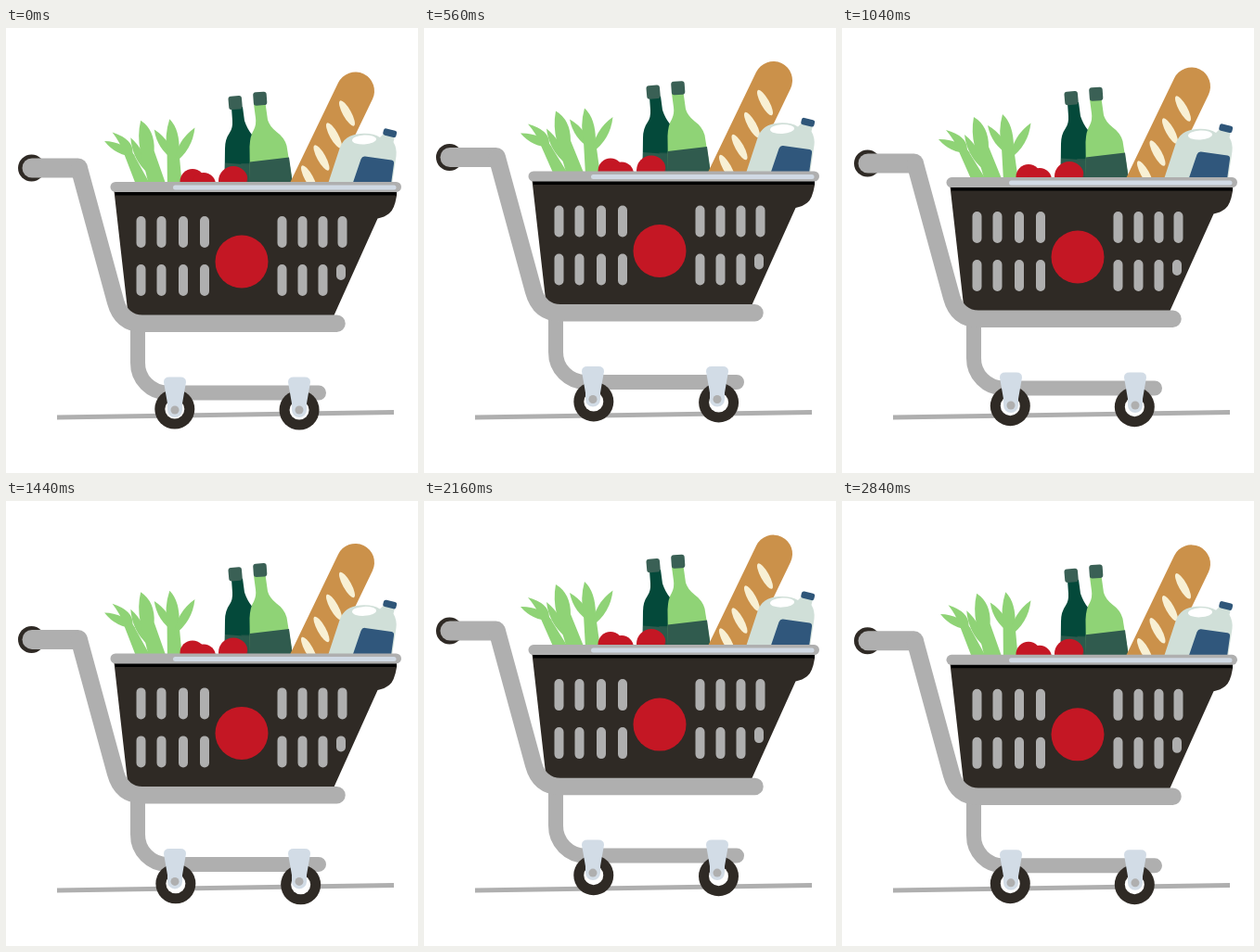
An HTML page for the animation above (2880 ms loop, 444 by 480 pixels).

```html
<!DOCTYPE html>
<html lang="en">
<head>
<meta charset="utf-8">
<title>Shopping cart</title>
<style>
  html, body { margin: 0; width: 100%; height: 100%; overflow: hidden; background: #fff; }
  svg { display: block; width: 100%; height: 100%; }
  .metal { fill: none; stroke: #afafaf; stroke-linecap: round; stroke-linejoin: round; }
  .leaf { fill: #8fd376; }
  .dark { fill: #2f2a25; }
  .red { fill: #c41724; }
  .cap { fill: #3a6055; }
</style>
</head>
<body>
<svg viewBox="0 0 444 480">
  <path class="metal" style="stroke-linecap:butt" stroke-width="5" d="M55 420L418 414.5"/>
  <g id="cart">
    <!-- groceries -->
    <g id="stalks" class="leaf"></g>
    <g id="sideLeaf" class="leaf"></g>
    <g class="red">
      <circle cx="201" cy="165.500" r="13.500"/>
      <circle cx="213" cy="169" r="13"/>
    </g>
    <path fill="#04493a" d="M243 86L255 85L257 100Q260 109 265 115Q269 120 269 130V168H235.500L236 130Q236 120 241 113Q244.500 108 244 100Z"/>
    <path fill="#2b5a4c" d="M236 145.500L268 148V168H235.500Z"/>
    <rect class="cap" x="239.800" y="73.300" width="14.500" height="14.500" rx="3" transform="rotate(-5 247 80)"/>
    <circle class="red" cx="245" cy="165" r="16"/>
    <path fill="#2b5a4c" opacity=".8" d="M253 146H266V168H259Q263 156 253 146Z"/>
    <path class="leaf" d="M267 82L279.500 81L282 99Q284 106 291.500 112Q300 118 302.500 127L309 168H263L262.500 128Q263 116 267 110Q270 104 269 97Z"/>
    <path fill="#305b4e" d="M262.500 144.500L305 139.500L309 168H263Z"/>
    <rect class="cap" x="266.500" y="69" width="14.500" height="14.500" rx="3" transform="rotate(-4 273 76)"/>
    <path fill="none" stroke="#cb914a" stroke-width="41" stroke-linecap="round" d="M376.500 68L325 175"/>
    <g id="scores" fill="#f8f0d4"></g>
    <path fill="#d0dfd8" d="M347 168L359.500 130Q364.500 115 382 114Q395 113 403 118L407 114L419 117L417.500 123Q421.500 130 420.500 138L416 168Z"/>
    <ellipse cx="386" cy="120.500" rx="13" ry="5" fill="#fff" transform="rotate(-3 386 120.500)"/>
    <rect x="406.500" y="109.500" width="14.500" height="7.500" rx="2.500" fill="#2f5679" transform="rotate(14 414 113)"/>
    <path fill="#30577c" d="M387 138.500L415.500 142.500Q418.500 143 418 146.500L415 168H373.500L382.500 141.500Q384 138 387 138.500Z"/>

    <!-- frame and basket -->
    <circle class="dark" cx="27.500" cy="151" r="14.500"/>
    <path class="metal" stroke-width="16" d="M142 322V361A32 32 0 0 0 174 393.500H337"/>
    <path class="dark" d="M116.500 176H421V181Q418.500 196 413 200Q408 204 400.500 205.500L353 311H150Q138 311 131 304Z"/>
    <path d="M117.500 176H421V180.500H118Z"/>
    <path class="metal" stroke-width="21" d="M28 151H77.500"/>
    <path class="metal" stroke-width="18.500" d="M79 152L118 295Q124.500 318.800 147 318.800H356.500"/>
    <path class="metal" stroke-width="11" d="M118 171.500H420.500"/>
    <path class="metal" stroke-width="5" style="stroke:#d0d9e4" d="M182.500 172H418"/>
    <path id="slots" class="metal" stroke-width="10"/>
    <circle class="red" cx="254" cy="252" r="28.500"/>
    <g id="wheels"></g>
  </g>
</svg>
<script>
const LOOP = 2880;
const get = id => document.getElementById(id);

const leaf = (x1, y1, x2, y2, w) => {
  const len = Math.hypot(x2 - x1, y2 - y1);
  const mx = (x1 + x2) / 2, my = (y1 + y2) / 2;
  const nx = (y1 - y2) / len * w, ny = (x2 - x1) / len * w;
  return `<path d="M${x1} ${y1}Q${mx + nx} ${my + ny} ${x2} ${y2}Q${mx - nx} ${my - ny} ${x1} ${y1}"/>`;
};

// A pointed stalk: tip, left and right shoulder below it, left and right foot.
const stalk = (x, y, drop, shoulderL, shoulderR, footL, footR) => `<path d="M${x} ${y}
  Q${shoulderL - 4} ${y + drop * 0.5} ${shoulderL} ${y + drop}L${footL} 170H${footR}
  L${shoulderR} ${y + drop}Q${shoulderR} ${y + drop * 0.3} ${x} ${y}"/>`;

get('stalks').innerHTML =
  leaf(104, 125, 138, 140, 9) + stalk(112, 115, 21, 125, 135, 140, 156) +
  leaf(132, 120, 153, 158, 9) + stalk(142, 101, 32, 143, 158, 154, 173) +
  leaf(157, 110, 180, 142, 9) + stalk(173, 98, 36, 172, 185, 174, 190);
get('sideLeaf').innerHTML = leaf(203.5, 107.5, 181, 146, 10);

get('scores').innerHTML = [[367.5, 92], [353.5, 116], [340, 140], [326.5, 162]]
  .map(([x, y]) => `<ellipse cx="${x}" cy="${y}" rx="4.500" ry="15.500" transform="rotate(-29 ${x} ${y})"/>`).join('');

const columns = [145.5, 167.5, 191, 214, 297.5, 319.5, 341.5, 362.5];
get('slots').setAttribute('d', columns.map((x, i) =>
  `M${x} 208V232` + (i < 7 ? `M${x} 260V284` : 'M361 260V267')).join(''));

get('wheels').innerHTML = [182, 316].map(x => `
  <g transform="translate(${x} 412)">
    <g class="tyre"><circle class="dark" r="21.500"/><circle r="10.500" fill="#fff"/></g>
    <path fill="#d2dce6" d="M-12 -30Q-12 -35.500 -6 -35.500H6Q12 -35.500 12 -30L8 -7V0A8 8 0 0 1 -8 0V-7Z"/>
    <circle r="4.500" fill="#afafaf"/>
  </g>`).join('');
const tyres = document.querySelectorAll('.tyre');

const smooth = p => (1 - Math.cos(Math.PI * p)) / 2;
const linear = p => p;
function track(keys, t, ease) {
  const i = keys.findIndex(k => k[0] > t);
  const [t0, a] = keys[i - 1], [t1, b] = keys[i];
  return a + (b - a) * ease((t - t0) / (t1 - t0));
}

// Vertical bounce of the cart, and the turning of its slightly eccentric tyres.
const bounce = [[-770, -11], [20, 0], [570, -11.5], [1350, -1.6], [1420, -1.6], [2110, -11], [2900, 0]];
const spin = [[0, 240], [560, 778], [1040, 1265], [1440, 1495], [1840, 1950], [2440, 2460], [2840, 2700], [2880, 2760]];

function draw(now) {
  const t = Math.floor(now % LOOP / 40) * 40;
  const lift = track(bounce, t, smooth);
  const angle = track(spin, t, linear) * Math.PI / 180;
  const sway = Math.min(1, Math.max(0, (-lift - 1.8) / 3));
  get('cart').setAttribute('transform', `translate(0 ${lift})`);
  get('stalks').setAttribute('transform', `rotate(${2.7 * (1 - sway)} 168 168)`);
  tyres.forEach((tyre, i) => {
    const x = 0.3 + i * 0.5 + (1 + i * 0.5) * Math.cos(angle);
    const y = 0.8 + i + 2 * Math.sin(angle);
    tyre.setAttribute('transform', `translate(${x} ${y})`);
  });
}

const start = performance.now();
function tick() {
  draw(performance.now() - start);
  requestAnimationFrame(tick);
}
tick();
</script>
</body>
</html>
```
